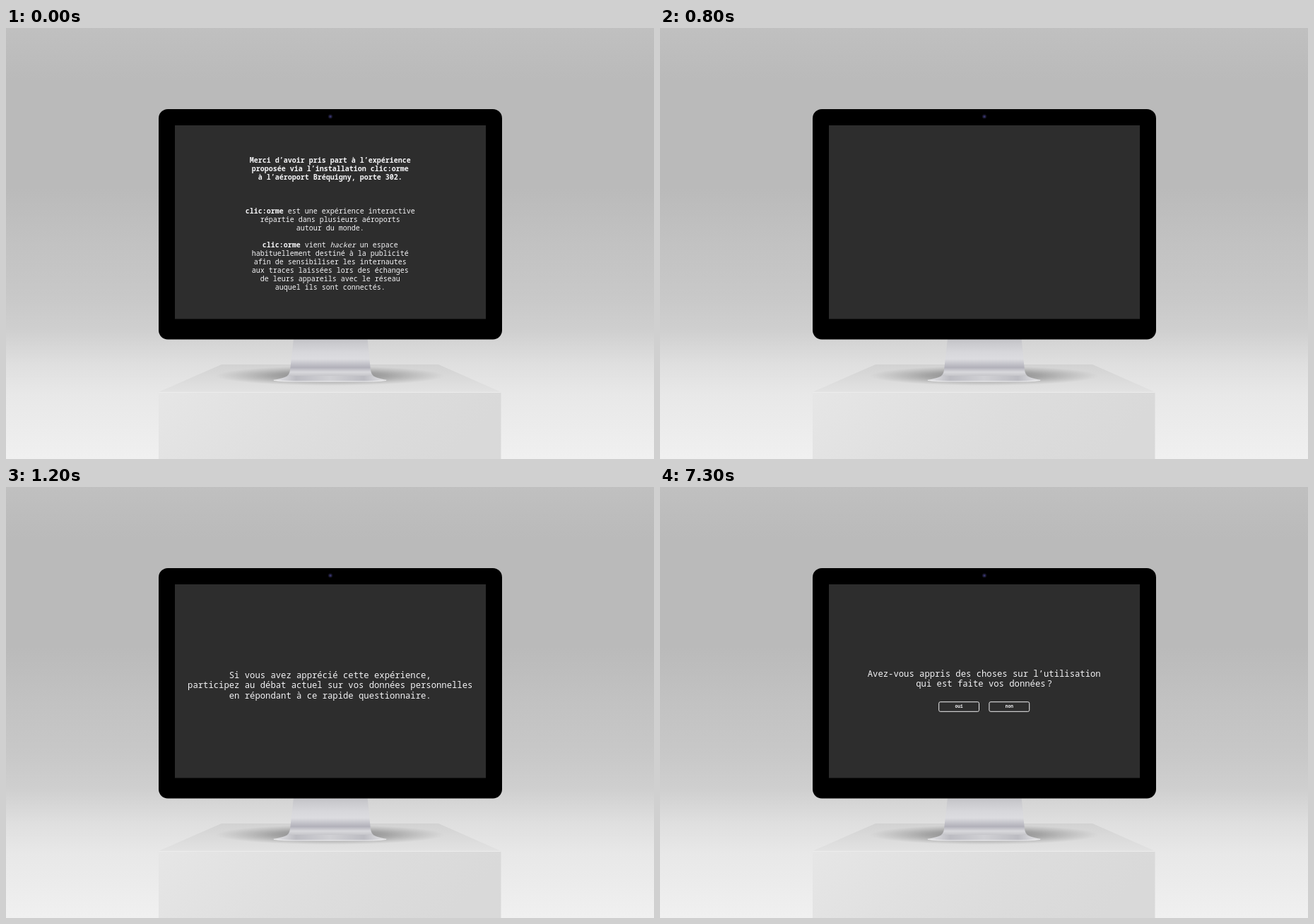
An HTML page for the animation above (8000 ms loop, 917 px wide and 611 px high).

```html
<!DOCTYPE html>
<html lang="fr">
<head>
<meta charset="utf-8">
<title>Questionnaire</title>
<style>
  html, body { margin: 0; width: 100%; height: 100%; overflow: hidden; background: #bababa; }
  svg { display: block; width: 100%; height: 100%; }
  text { font: 12.22px "Noto Sans Mono", "DejaVu Sans Mono", monospace; fill: #f4f4f6; text-anchor: middle; }
  .small text { font-size: 10px; }
  .strong { font-weight: 600; }
  .button text { font-size: 6.1px; font-weight: 700; }
  .button rect { fill: none; stroke: #f0f0f2; }
</style>
</head>
<body>
<svg viewBox="0 0 917 611" preserveAspectRatio="none">
  <defs>
    <linearGradient id="wall" x2="0" y2="1">
      <stop offset="0" stop-color="#c0c0c0"/>
      <stop offset=".12" stop-color="#bababa"/>
      <stop offset=".37" stop-color="#bababa"/>
      <stop offset=".5" stop-color="#c2c2c2"/>
      <stop offset=".62" stop-color="#c8c8c8"/>
      <stop offset=".7" stop-color="#cfcfcf"/>
      <stop offset=".78" stop-color="#dfdfdf"/>
      <stop offset=".85" stop-color="#e8e8e8"/>
      <stop offset="1" stop-color="#f0f0f0"/>
    </linearGradient>
    <linearGradient id="top" x2="0" y2="1">
      <stop offset="0" stop-color="#d2d2d2"/>
      <stop offset="1" stop-color="#e2e2e2"/>
    </linearGradient>
    <linearGradient id="front" x2="1" y2=".2">
      <stop offset="0" stop-color="#e6e6e6"/>
      <stop offset=".6" stop-color="#dddddd"/>
      <stop offset="1" stop-color="#d9d9d9"/>
    </linearGradient>
    <linearGradient id="metal" x2="0" y2="1">
      <stop offset="0" stop-color="#c2c2c6"/>
      <stop offset=".35" stop-color="#d6d6da"/>
      <stop offset=".55" stop-color="#dcdce0"/>
      <stop offset=".78" stop-color="#b2b1ba"/>
      <stop offset=".9" stop-color="#d8d8dc"/>
      <stop offset="1" stop-color="#c6c6ca"/>
    </linearGradient>
    <linearGradient id="foot">
      <stop offset="0" stop-color="#e8e8ea"/>
      <stop offset=".2" stop-color="#bcbcc2"/>
      <stop offset=".5" stop-color="#d0d0d4"/>
      <stop offset=".8" stop-color="#bcbcc2"/>
      <stop offset="1" stop-color="#e8e8ea"/>
    </linearGradient>
    <radialGradient id="shadow">
      <stop offset="0" stop-color="#606060" stop-opacity=".8"/>
      <stop offset=".5" stop-color="#707070" stop-opacity=".5"/>
      <stop offset="1" stop-color="#808080" stop-opacity="0"/>
    </radialGradient>
  </defs>

  <rect width="917" height="611" fill="url(#wall)"/>

  <path d="M305 477H612L700.500 516H216Z" fill="url(#top)"/>
  <ellipse cx="458.500" cy="493" rx="162" ry="14" fill="url(#shadow)"/>
  <path d="M216 516H700.500V611H216Z" fill="url(#front)"/>
  <path d="M216 516.500H700.500" stroke="#ececec"/>

  <path d="M378 499Q398 496 402 490H516Q520 496 539 499Q530 501.500 510 501.500H407Q385 501.500 378 499Z" fill="url(#foot)"/>
  <path d="M407 440H511.500L516 485Q517 491 520 493H398Q401 491 402 485Z" fill="url(#metal)"/>
  <path d="M379 499.500Q390 501 407 501H510Q528 501 538 499.500" fill="none" stroke="#eeeeef"/>

  <rect x="216" y="115" width="486" height="326.500" rx="13"/>
  <circle cx="459" cy="125.500" r="3" fill="#17162a"/>
  <circle cx="459" cy="125.500" r="1.500" fill="#36346c"/>
  <rect x="239" y="138" width="440" height="274.500" fill="#2d2d2d"/>
  <g id="screens"></g>
</svg>
<script>
const CENTER = 458.7;
const LOOP = 8000;

const line = (content, y, attrs = "") => `<text x="${CENTER}" y="${y}" ${attrs}>${content}</text>`;
const lines = (rows, y, step, attrs) =>
  rows.map((row, i) => line(row, y + i * step, attrs)).join("");
const title = (rows, y) => lines(rows, y, 14.67);
const ask = text => `${text}<tspan dx="2.2">?</tspan>`;

const buttonRow = (labels, y) => labels.map((label, i) => {
  const x = CENTER + (i - (labels.length - 1) / 2) * 71.2;
  return `<g class="button"><rect x="${x - 28.4}" y="${y}" width="56.800" height="13.600" rx="2"/>
    <text x="${x}" y="${y + 8.5}">${label}</text></g>`;
}).join("");

const thanks = `<g class="small">` +
  lines([
    "Merci d’avoir pris part à l’expérience",
    "proposée via l’installation clic:orme",
    "à l’aéroport Bréquigny, porte 302."
  ], 190.7, 12, 'class="strong"') +
  lines([
    '<tspan class="strong">clic:orme</tspan> est une expérience interactive',
    "répartie dans plusieurs aéroports",
    "autour du monde."
  ], 262.7, 12) +
  lines([
    '<tspan class="strong">clic:orme</tspan> vient <tspan font-style="italic">hacker</tspan> un espace',
    "habituellement destiné à la publicité",
    "afin de sensibiliser les internautes",
    "aux traces laissées lors des échanges",
    "de leurs appareils avec le réseau",
    "auquel ils sont connectés."
  ], 310.7, 12) + "</g>";

const invitation = title([
  "Si vous avez apprécié cette expérience,",
  "participez au débat actuel sur vos données personnelles",
  "en répondant à ce rapide questionnaire."
], 270.6);

const opinion = title([ask("Qu’avez-vous pensé de l’expérience")], 268.6) +
  buttonRow(["effrayante", "surprenante", "divertissante", "intrigante"], 304.7) +
  buttonRow(["autre"], 333.4);

const yesNo = buttonRow(["oui", "non"], 304.7);
const learned = title([ask("Avez-vous appris des choses sur vos données")], 268.6) + yesNo;
const usage = title([
  "Avez-vous appris des choses sur l’utilisation",
  ask("qui est faite vos données")
], 268.6) + yesNo;

const container = document.getElementById("screens");
container.innerHTML = [thanks, invitation, opinion, learned, usage]
  .map(screen => `<g>${screen}</g>`).join("");
const screens = [...container.children];

const clamp = value => Math.max(0, Math.min(1, value));

function render(t) {
  const tick = Math.floor(t / 100); // fades advance in 100 ms steps
  const opacities = [
    clamp(1 - (tick - 4) / 3),
    t < 4300 ? clamp(0.1 + 0.3 * (tick - 9)) : 0,
    t >= 4300 && t < 5800 ? 1 : 0,
    t >= 5800 && t < 7300 ? 1 : 0,
    t >= 7300 ? 1 : 0
  ];
  screens.forEach((screen, i) => screen.setAttribute("opacity", opacities[i]));
}

const start = performance.now();
function loop() {
  render((performance.now() - start) % LOOP);
  requestAnimationFrame(loop);
}
loop();
</script>
</body>
</html>
```
